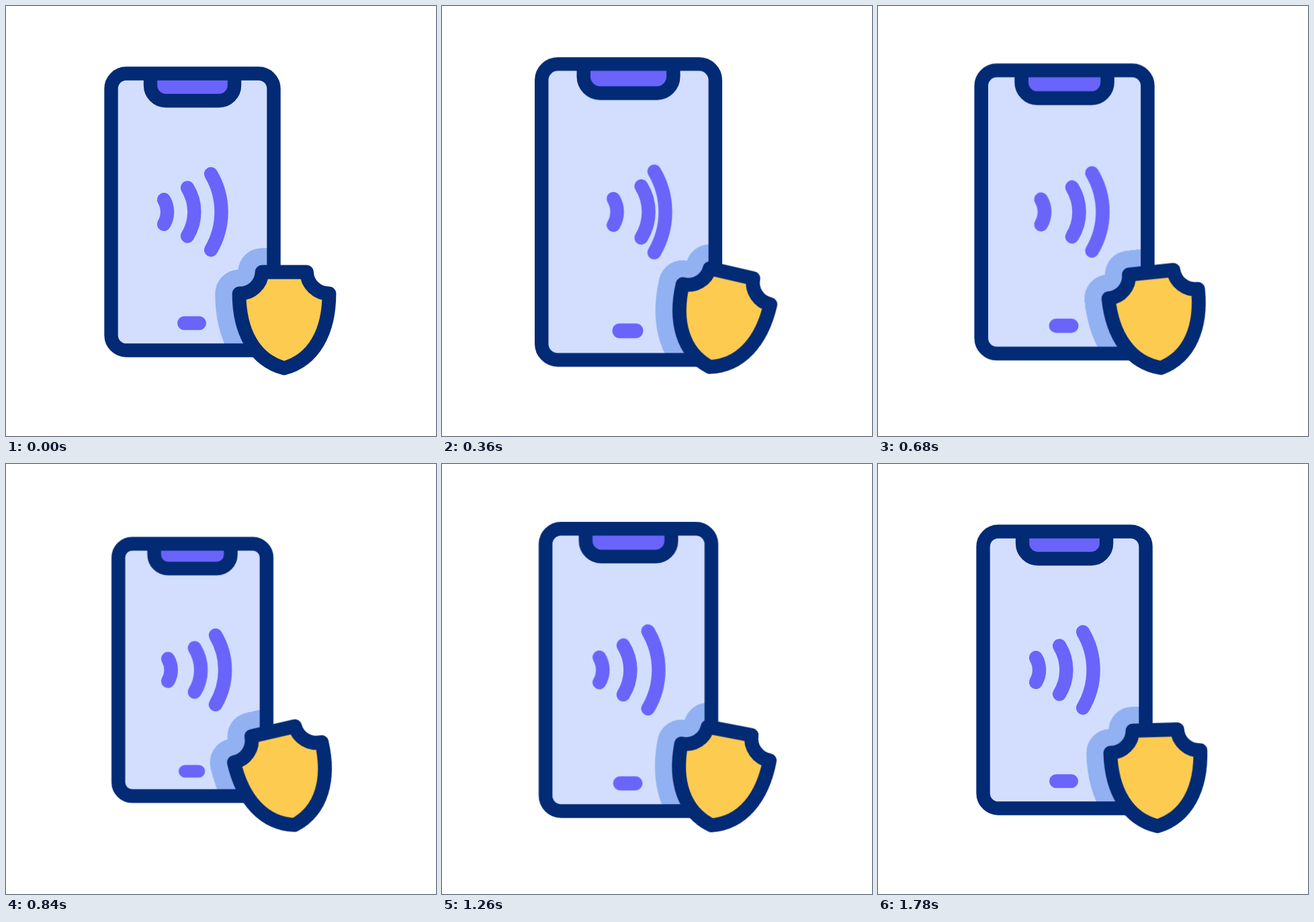
These frames come from a looping animation (640x640 px, 1.8 s). An HTML page:

```html
<!DOCTYPE html>
<html lang="en">
<head>
<meta charset="utf-8">
<title>Phone security</title>
<style>
  html, body { margin: 0; width: 100%; height: 100%; overflow: hidden; background: #fff; }
  svg { display: block; width: 100%; height: 100%; }

  .phone, .wave, .swing {
    animation: 1800ms cubic-bezier(.333, 0, .667, 1) infinite;
  }
  .phone { animation-name: bounce; transform-origin: 277.5px 306.5px; stroke-width: 20.4px; }
  .swing { animation-name: swing; transform-origin: 414px 470px; }
  .near { animation-name: near; }
  .middle { animation-name: middle; }
  .far { animation-name: far; }

  .navy { stroke: #032a75; }
  .wave { fill: none; stroke: #6a64fa; stroke-linecap: round; }

  /* The stroke width counters the scale, so lines keep their weight. */
  @keyframes bounce {
    0%, 4.72% { transform: scale(1); stroke-width: 20.4px; }
    29.17% { transform: scale(1.1); stroke-width: 18.55px; }
    49.72% { transform: scale(.9); stroke-width: 22.67px; }
    63.44% { transform: scale(1.052); stroke-width: 19.39px; }
    77.17% { transform: scale(.984); stroke-width: 20.73px; }
    90.89% { transform: scale(1.003); stroke-width: 20.34px; }
    97.8%, 100% { transform: scale(1); stroke-width: 20.4px; }
  }
  @keyframes swing {
    0% { transform: rotate(0deg); }
    19.72% { transform: rotate(13deg); }
    47.22% { transform: rotate(-13deg); }
    65.56% { transform: rotate(13.3deg); }
    87.78% { transform: rotate(-10deg); animation-timing-function: cubic-bezier(.333, 0, .667, .731); }
    100% { transform: rotate(-.9deg); }
  }
  @keyframes near {
    0%, 55.56%, 100% { transform: translateX(0); }
    11.11% { transform: translateX(24.2px); }
  }
  @keyframes middle {
    0%, 66.67%, 100% { transform: translateX(0); }
    22.22% { transform: translateX(26px); }
  }
  @keyframes far {
    0%, 77.78%, 100% { transform: translateX(0); }
    33.33% { transform: translateX(13px); }
  }
</style>
</head>
<body>
<svg viewBox="0 0 640 640">
  <defs>
    <rect id="body" x="156.5" y="100.5" width="242" height="412" rx="22.5"/>
    <path id="shield" stroke-linejoin="round"
      d="M381 396H447.5A33 33 0 0 0 481 428C481 485 458 527 414 539C370 527 347 485 347 428A33 33 0 0 0 381 396Z"/>
    <clipPath id="screen">
      <rect class="phone" x="156.5" y="100.5" width="242" height="412" rx="22.5"/>
    </clipPath>
  </defs>

  <g class="phone">
    <use href="#body" fill="#d3defe"/>
  </g>

  <g clip-path="url(#screen)">
    <g class="swing">
      <use href="#shield" fill="#92b1f2" stroke="#92b1f2" stroke-width="71.5"/>
    </g>
  </g>

  <g class="phone">
    <path class="navy" fill="#6a64fa" d="M215 100.5V118a23 23 0 0 0 23 23H317a23 23 0 0 0 23-23V100.5"/>
    <use class="navy" href="#body" fill="none"/>
    <rect x="255" y="461.7" width="43" height="20.6" rx="10.3" fill="#6a64fa"/>
    <path class="wave near" d="M235 288.2A35.8 35.8 0 0 1 235 324.8"/>
    <path class="wave middle" d="M270 270.5A68 68 0 0 1 270 342.5"/>
    <path class="wave far" d="M305 250A110.7 110.7 0 0 1 305 363"/>
  </g>

  <g class="swing">
    <use class="navy" href="#shield" fill="#fdcb50" stroke-width="20.8"/>
  </g>
</svg>
</body>
</html>
```
